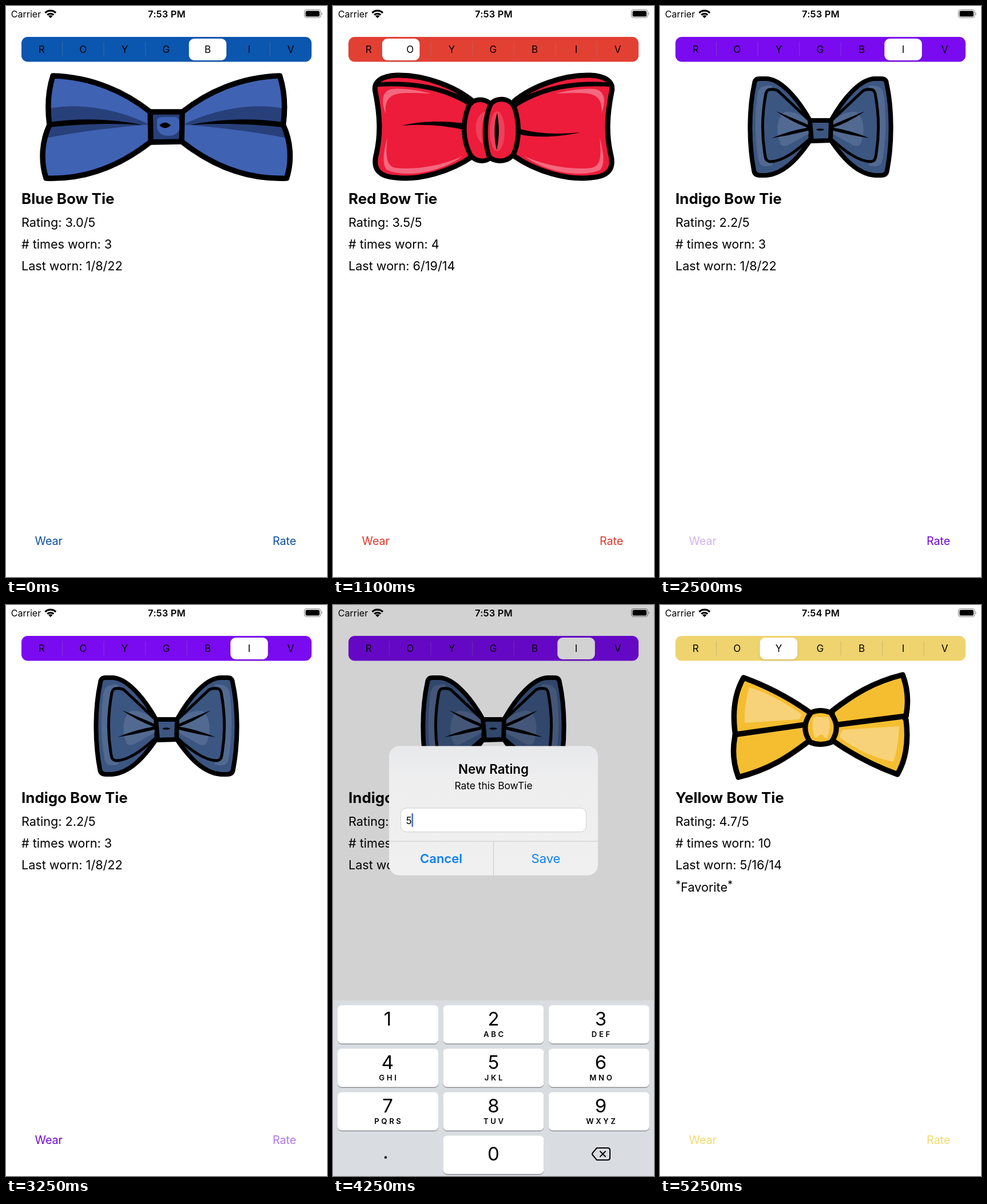
An HTML page for the animation above (5.48 s loop, 561x998 px).

```html
<!DOCTYPE html>
<html lang="en">
<head>
<meta charset="utf-8">
<title>Bow ties</title>
<style>
  html, body { margin: 0; width: 100%; height: 100%; overflow: hidden; background: #fff; }
  svg { display: block; width: 561px; height: 998px; }
  text { font-family: Inter, "Liberation Sans", sans-serif; white-space: pre; }
  .mid { text-anchor: middle; }
  .line { fill: none; stroke: #000; stroke-linejoin: round; stroke-linecap: round; }
  .edge { stroke: #000; stroke-linejoin: round; stroke-linecap: round; }
</style>
</head>
<body>
<svg id="stage" viewBox="0 0 561 998">
  <defs>
    <linearGradient id="glass" x1="0" y1="0" x2="0" y2="1">
      <stop offset="0" stop-color="#e8e9eb"/>
      <stop offset=".25" stop-color="#eeeeef"/>
      <stop offset="1" stop-color="#f0f0f1"/>
    </linearGradient>
    <filter id="soft" x="-20%" y="-20%" width="140%" height="150%">
      <feDropShadow dx="0" dy="2" stdDeviation="2.5" flood-opacity=".1"/>
    </filter>

    <g id="blueWing">
      <path fill="#3f62b3" d="M82 122C150 124 208 150 252 185V238C205 275 145 304 70 301C60 270 63 235 76 208C72 178 73 150 82 122Z"/>
      <path fill="#28407a" d="M76 179C130 169 195 180 250 207C190 212 130 219 69 231L76 208Z"/>
      <path d="M75 203C130 195 190 197 238 208C190 204 130 206 75 212Z"/>
      <path class="line" stroke-width="9.5" d="M252 185C208 150 150 124 82 122C73 150 72 178 76 208C63 235 60 270 70 301C145 304 205 275 252 238"/>
    </g>

    <g id="redWing">
      <path class="edge" fill="#ec1c3a" stroke-width="9" d="M244 166C214 141 160 120 112 121C85 122 70 132 74 150C82 190 84 225 75 262C70 285 80 298 110 300C150 305 205 290 245 262Z"/>
      <path d="M76 134C135 129 190 137 244 167L240 176C195 148 145 137 76 141Z"/>
      <g fill="#f4687f">
        <path d="M92 188C82 162 88 146 106 145C130 144 152 148 171 153C140 152 115 150 103 157C92 164 91 175 92 188Z"/>
        <path d="M95 230C87 258 86 280 95 287C130 301 190 290 227 262C195 278 145 287 110 283C92 280 92 260 95 230Z"/>
      </g>
    </g>

    <g id="indigoWing">
      <path class="edge" fill="#3c5682" stroke-width="8" d="M262 200C240 160 210 127 185 127H174Q166 127 165 135C155 180 155 240 164 287Q165 296 175 296H185C215 294 240 268 263 234Z"/>
      <path fill="#526a91" d="M196 139C178 138 172 143 170 155C165 195 166 235 172 268C174 279 180 282 196 279Z"/>
      <path class="edge" fill="#3c5682" stroke-width="5" d="M261 200L207 149Q202 145 192 146Q187 146 185 153C178 190 178 230 184 263Q185 271 192 272C215 272 240 252 262 232Z"/>
      <path fill="#526a91" d="M218 185C204 195 202 220 210 240C213 246 220 246 226 242L262 222V206C250 190 235 184 218 185Z"/>
      <path d="M203 184Q235 197 262 209V214Q232 204 203 184ZM195 231Q228 217 262 212V217Q228 226 195 231Z"/>
    </g>

    <path id="yellowWing" class="edge" fill="#f5be30" stroke-width="9.5" d="M146 127C190 143 230 165 262 188L260 238C225 265 190 288 137 301C129 280 126 255 131 229L133 225L131 222C127 190 130 155 146 127Z"/>
  </defs>

  <g id="status">
    <text x="8.8" y="20" font-size="16">Carrier</text>
    <path fill="none" stroke="#000" stroke-width="3.2" d="M68.5 12A13.2 13.2 0 0 1 87 12M72.3 15.7A7.7 7.7 0 0 1 83.2 15.7"/>
    <path d="M77.8 21.3L74.2 17.6A5.2 5.2 0 0 1 81.4 17.6Z"/>
    <text id="clock" class="mid" x="281" y="20" font-size="16.4" font-weight="600" letter-spacing=".2"></text>
    <rect x="521.5" y="6.5" width="28.5" height="14" rx="4.3" fill="none" stroke="#8a8a8a" stroke-width="1.2"/>
    <rect x="523.5" y="8.5" width="24.5" height="10" rx="2.6"/>
    <path fill="#8a8a8a" d="M551.5 11Q554 13.5 551.5 16Z"/>
  </g>

  <rect id="bar" x="27" y="54" width="507" height="43.5" rx="11"/>
  <g id="seps" fill="#8e8e93"></g>
  <rect id="thumb" y="57" width="65.5" height="38" rx="9" fill="#fff" filter="url(#soft)"/>
  <g id="letters"></g>

  <g id="tieB">
    <use href="#blueWing"/>
    <use href="#blueWing" transform="matrix(-1 0 0 1 560.5 0)"/>
    <path class="edge" fill="#28407a" stroke-width="9.5" d="M252 185H308L307 237L253 238Z"/>
    <path fill="#3f62b3" d="M264 200Q264 194 275 194L296 194Q303 196 303 203V216Q298 227 283 227Q266 226 264 212Z"/>
    <path d="M268 208.5Q278 199 288 208.5Q278 218 268 208.5Z"/>
  </g>

  <g id="tieR">
    <use href="#redWing"/>
    <use href="#redWing" transform="matrix(-1 0 0 1 561 0)"/>
    <path d="M120 209C160 200 195 201 228 205V216C190 208 160 206 120 209ZM324 214C355 223 390 225 432 221C395 229 355 231 324 224Z"/>
    <path class="edge" fill="#ec1c3a" stroke-width="8.5" d="M277 173C266 160 243 160 236 178C226 205 227 235 240 260C250 274 268 273 276 264Z"/>
    <path fill="#ef3f5a" d="M268 184C245 188 244 230 262 241C258 220 260 200 268 184Z"/>
    <path class="edge" fill="#ec1c3a" stroke-width="8.5" d="M275 173C282 159 310 158 318 180C326 205 326 235 316 258C305 275 280 273 273 263C263 235 265 195 275 173Z"/>
    <ellipse cx="287" cy="219" rx="13" ry="35" fill="#ef3f5a"/>
    <path d="M287 187C291 210 291 230 286 252C281 230 281 205 287 187Z"/>
  </g>

  <g id="tieI">
    <use href="#indigoWing"/>
    <use href="#indigoWing" transform="matrix(-1 0 0 1 561 0)"/>
    <path class="edge" fill="#3c5682" stroke-width="8" d="M262 200H299L298 235L265 236Z"/>
    <ellipse cx="280" cy="216" rx="6.5" ry="1.8"/>
  </g>

  <g id="tieY">
    <use href="#yellowWing"/>
    <use href="#yellowWing" transform="rotate(180 280.5 211.5)"/>
    <g fill="#f7d278">
      <path d="M156 144C150 165 147 185 148 206L243 200Q250 192 245 189C215 169 185 152 156 144Z"/>
      <path d="M408 274C414 255 417 235 418 212L320 218Q311 228 316 233C346 254 376 268 408 274Z"/>
    </g>
    <path class="line" stroke-width="9.5" d="M131 226.5L254 209M308 209.5L430 194"/>
    <path class="edge" fill="#f5be30" stroke-width="9" d="M264 188Q280 181 298 188Q318 214 299 240Q280 247 263 240Q244 214 264 188Z"/>
    <path fill="#f7d278" d="M268 197Q274 194 278 196H285Q290 194 295 197Q300 215 292 232Q288 234 285 228Q281 225 277 229Q273 234 270 231Q264 213 268 197Z"/>
  </g>

  <text id="name" x="27" y="346" font-size="25.9" font-weight="700"></text>
  <g font-size="21.6">
    <text id="rating" x="27" y="385.7"></text>
    <text id="worn" x="27" y="424"></text>
    <text id="last" x="27" y="462.3"></text>
    <text id="fav" x="27.3" y="501"><tspan font-size="18" dy="-6">*</tspan><tspan dy="6">Favorite</tspan><tspan font-size="18" dy="-6">*</tspan></text>
  </g>
  <g id="buttons" font-size="19.7">
    <text id="wear" x="50.5" y="942">Wear</text>
    <text id="rate" x="507.3" y="942" text-anchor="end">Rate</text>
  </g>

  <rect id="dim" width="561" height="998"/>

  <g id="alert">
    <rect x="98" y="246.5" width="365" height="226" rx="18" fill="url(#glass)"/>
    <path id="saveDown" fill="#dcdcde" d="M280.5 413H463V454.5Q463 472.5 445 472.5H280.5Z"/>
    <text class="mid" x="280.5" y="295" font-size="22.4" font-weight="600">New Rating</text>
    <text class="mid" x="280.5" y="322" font-size="17.4">Rate this BowTie</text>
    <rect x="118.5" y="355" width="324" height="41.5" rx="10" fill="#fff" stroke="#cfcfd1"/>
    <text id="typed" x="127.5" y="383" font-size="17.2">5</text>
    <rect id="caret" y="364" width="2.6" height="24" rx="1.3" fill="#4a72e0"/>
    <path stroke="#c8c8ca" d="M98 413H463M280.5 413V472.5"/>
    <g class="mid" font-size="22" fill="#0a7ff5">
      <text x="189" y="451" font-weight="600">Cancel</text>
      <text x="372" y="451">Save</text>
    </g>
  </g>

  <g id="board">
    <rect id="panel" y="691" width="561" height="320" fill="#d9dce0"/>
    <g id="keys"></g>
  </g>
</svg>
<script>
const LOOP = 5480, STEP = 50;
const $ = id => document.getElementById(id);
const set = (id, attrs) => { for (const k in attrs) $(id).setAttribute(k, attrs[k]); };
const show = (id, on) => { $(id).style.display = on ? '' : 'none'; };
const label = (x, y, size, str, extra = '') =>
  `<text class="mid" x="${x}" y="${y}" font-size="${size}" ${extra}>${str}</text>`;

const NAMES = 'ROYGBIV';
const PITCH = 72.55;

const ties = {
  B: { name: 'Blue', bar: '#0b56ae', tint: '#0b4fa3', rating: '3.0', worn: 3, last: '1/8/22' },
  R: { name: 'Red', bar: '#e34034', tint: '#dd3829', rating: '3.5', worn: 4, last: '6/19/14' },
  I: { name: 'Indigo', bar: '#7a0af0', tint: '#6f08d6', rating: '2.2', worn: 2, last: '5/19/14' },
  Y: { name: 'Yellow', bar: '#efd36e', tint: '#f4da6c', rating: '4.7', worn: 10, last: '5/16/14', fav: true }
};

// Time of each pick in the segmented control
const picks = [[0, 'B'], [400, 'Y'], [1050, 'R'], [1450, 'I'], [5000, 'Y']];

const wearFade = [[2400, .55], [2450, .3], [2550, .75], [2600, 1]];
const rateFade = [[3250, .55], [3300, .75], [3350, 1]];

function build() {
  let seps = '', letters = '', keys = '';
  [...NAMES].forEach((c, i) => {
    if (i) seps += `<rect id="sep${i}" x="${25.3 + PITCH * i}" y="63" width="1.3" height="25" opacity=".3"/>`;
    letters += label(62.3 + PITCH * i, 82.3, 17, c);
  });
  const centers = [95.5, 280.5, 468];
  const subs = ['', 'ABC', 'DEF', 'GHI', 'JKL', 'MNO', 'PQRS', 'TUV', 'WXYZ'];
  const key = (n, col, y, digitY) => {
    const x = 8 + 184.4 * col;
    keys += `<rect x="${x}" y="${y + 1.4}" width="176" height="67" rx="7" fill="#8b8d91"/>
      <rect id="key${n}" x="${x}" y="${y}" width="176" height="67" rx="7" fill="#fff"/>`
      + label(centers[col], digitY, 33, n);
  };
  subs.forEach((s, i) => {
    const col = i % 3, y = 699.5 + 76 * Math.floor(i / 3);
    key(i + 1, col, y, y + 35.5);
    keys += label(centers[col] + 1.9, y + 55.5, 13.2, s, 'font-weight="600" letter-spacing="3.6"');
  });
  key(0, 1, 927.5, 971);
  keys += `<circle cx="92" cy="965.5" r="2.2"/>
    <path class="line" stroke-width="2" d="M461 949H480Q484 949 484 953V966Q484 970 480 970H461L453.5 961Q452.5 959.5 453.5 958ZM467 955L476 964M476 955L467 964"/>`;
  $('seps').innerHTML = seps;
  $('letters').innerHTML = letters;
  $('keys').innerHTML = keys;
}

const spring = x => x <= 0 ? 0 : 1 - (1 + x) * Math.exp(-x);

function fade(table, t) {
  let v = 1;
  for (const [at, a] of table) if (t >= at) v = a;
  return v;
}

// How far the sheet is open: 0 hidden, 1 at rest
function sheet(t) {
  if (t < 3300 || t >= 4800) return 0;
  if (t > 4500) return 1 - spring(.037 * (t - 4525));
  return t >= 3650 ? 1 : 1 - .0375 * Math.pow(.2, (t - 3350) / STEP);
}

function drawPage(t) {
  let n = picks.length - 1;
  while (picks[n][0] > t) n--;
  const [at, id] = picks[n];
  const tie = ties[id];
  const to = NAMES.indexOf(id);
  const from = n ? NAMES.indexOf(picks[n - 1][1]) : to;
  const p = t - at >= 200 ? 1 : spring(.0295 * (t - at + 20));

  set('thumb', { x: 29.5 + PITCH * (from + (to - from) * p) });
  set('bar', { fill: tie.bar });
  set('buttons', { fill: tie.tint });
  for (let i = 1; i < 7; i++) show('sep' + i, i !== to && i !== to + 1);
  for (const k in ties) show('tie' + k, k === id);

  const wornAgain = id === 'I' && t >= 2450;
  const rated = id === 'I' && t >= 4550;
  $('name').textContent = tie.name + ' Bow Tie';
  $('rating').textContent = `Rating: ${rated ? '5.0' : tie.rating}/5`;
  $('worn').textContent = '# times worn: ' + (tie.worn + (wornAgain ? 1 : 0));
  $('last').textContent = 'Last worn: ' + (wornAgain ? '1/8/22' : tie.last);
  show('fav', !!tie.fav);
  $('clock').textContent = t >= 5050 ? '7:54 PM' : '7:53 PM';
  set('wear', { opacity: fade(wearFade, t) });
  set('rate', { opacity: fade(rateFade, t) });
}

function drawSheet(t) {
  const p = sheet(t), open = p > 0, closing = t > 4500;
  for (const id of ['dim', 'alert', 'board']) show(id, open);
  if (!open) return;
  const drop = 307 * (1 - p);
  const scale = closing ? 1 : 1 + .25 * (1 - p);
  const lift = closing ? 0 : drop / 2;
  set('dim', { opacity: .177 * p });
  set('alert', {
    opacity: t >= 3350 && !closing ? 1 : p,
    transform: `translate(280.5 ${359.5 + lift}) scale(${scale}) translate(-280.5 -359.5)`
  });
  set('keys', { transform: `translate(0 ${drop})` });
  set('panel', { y: 691 + Math.max(0, drop - 12) });
  set('key5', { fill: t >= 3900 && t < 4000 ? '#b4b8c1' : '#fff' });
  show('typed', t >= 3950);
  show('caret', t < 3700 || t >= 3900);
  set('caret', { x: t >= 3950 ? 137.4 : 127.8 });
  show('saveDown', t >= 4500);
}

function draw(now) {
  const t = Math.floor((now % LOOP) / STEP) * STEP;
  drawPage(t);
  drawSheet(t);
}

build();
const start = performance.now();
function tick() {
  draw(performance.now() - start);
  requestAnimationFrame(tick);
}
tick();
</script>
</body>
</html>
```
